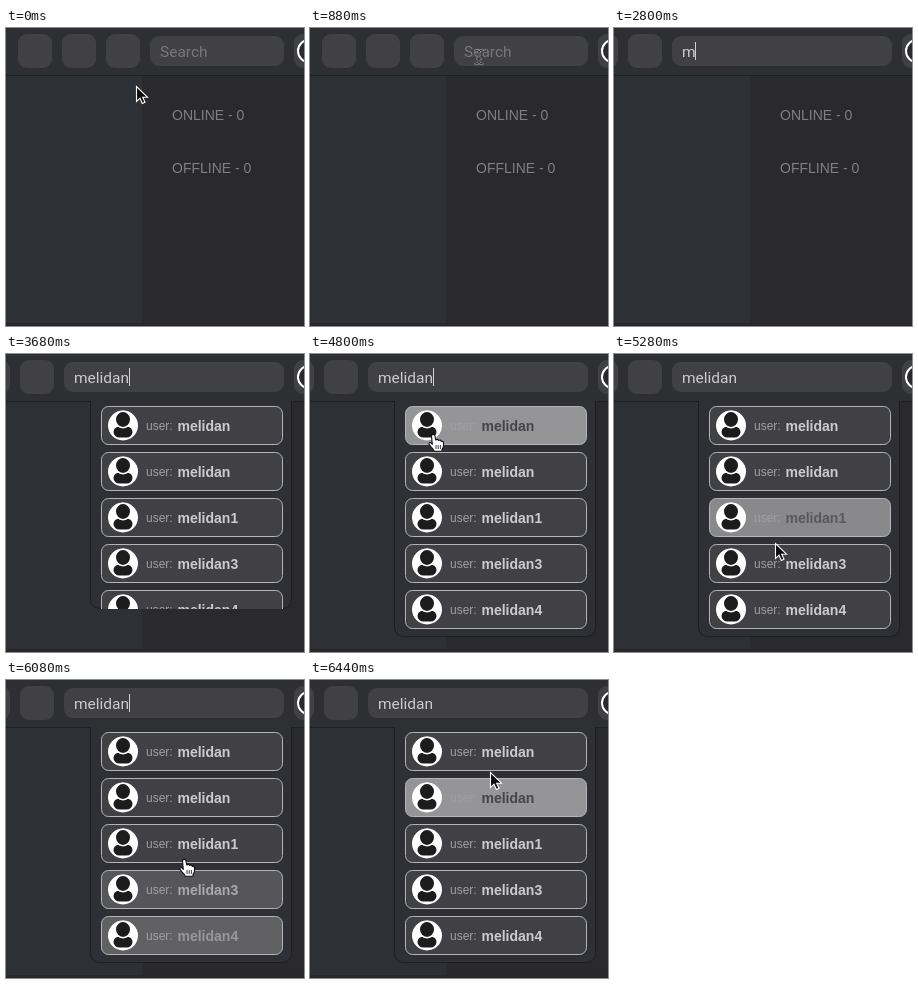
Write an HTML page that moves like this. It is 298 px wide and 298 px high and loops after 6480 ms.

```html
<!DOCTYPE html>
<html lang="en">
<head>
<meta charset="utf-8">
<title>User search</title>
<style>
  html, body { margin: 0; width: 100%; height: 100%; overflow: hidden; background: #2d3035; }
  svg { display: block; width: 100%; height: 100%; }
  text { font-family: "Liberation Sans", Arial, sans-serif; white-space: pre; }
  .input { font: 400 15.5px Roboto, Inter, sans-serif; }
  .status { font-size: 14px; fill: #7f7f83; }
  .label { font-size: 12px; fill: #a0a0a2; }
  .name { font-size: 14px; font-weight: 700; }
</style>
</head>
<body>
<svg viewBox="0 0 298 298">
  <defs>
    <clipPath id="panelClip"><rect id="clipBox" x="85" y="47" width="201" height="0"/></clipPath>
    <g id="avatar">
      <circle r="15" fill="#fff"/>
      <rect x="-9.5" y="1" width="19" height="11" rx="6" fill="#1c1c1c"/>
      <ellipse cy="-6" rx="7.8" ry="8.2" fill="#1c1c1c" stroke="#fff" stroke-width="1.6"/>
    </g>
    <path id="stem" d="M-3.5-7Q-.5-7 0-5Q.5-7 3.5-7M0-5V5M-3.5 7Q-.5 7 0 5Q.5 7 3.5 7M-2 2H2"/>
  </defs>

  <rect width="298" height="298" fill="#2d3035"/>
  <rect x="136" y="47" width="162" height="251" fill="#2a2a2e"/>
  <rect y="295" width="298" height="3" fill="#2b252c"/>
  <rect width="298" height="47" fill="#2d2f33"/>
  <rect y="47" width="298" height="1" fill="#1f2023"/>
  <text class="status" x="166" y="92">ONLINE - 0</text>
  <text class="status" x="166" y="145">OFFLINE - 0</text>

  <g id="buttons" fill="#414145"></g>
  <rect id="field" y="8" height="30" rx="9" fill="#414145"/>
  <text id="hint" class="input" y="29" fill="#78787c">Search</text>
  <text id="typed" class="input" x="68" y="29" fill="#cbcbcf"></text>
  <rect id="caret" y="14" width="1" height="18" fill="#d0d0d2"/>
  <rect x="288" y="6" width="34" height="34" rx="9" fill="#414145"/>
  <circle cx="303" cy="23" r="11" fill="#2a2a2e" stroke="#fff" stroke-width="2"/>

  <g id="panel">
    <path id="panelBox" fill="#2e3035" stroke="#1d1e21"/>
    <g id="items" clip-path="url(#panelClip)"></g>
  </g>

  <path id="arrow" d="M.5.5V15.5L4 12.200L6.300 17.5L9 16.300L6.700 11.200H11.5Z" fill="#0c0c0c" stroke="#fff" stroke-width="1.1"/>
  <g id="beam" fill="none" stroke-linecap="round">
    <use href="#stem" stroke="#c8c8c8" stroke-opacity=".55" stroke-width="2.4"/>
    <use href="#stem" stroke="#222"/>
  </g>
  <g id="hand" stroke="#111">
    <path d="M-1.7 9.5L-2.5 1Q-2.3-.6-.8-.6T1 1L1.7 5Q4 3.500 4.600 5.5Q6.800 4.300 7.200 6.400Q9.5 5.800 9.5 8.200V11.5Q9 13 8 14.5V16.200H.3Q-.5 14.5-2.800 12.200L-5 9.300Q-5.300 7.500-3.700 7.500Q-2.600 7.800-1.700 9.5Z" fill="#fff" stroke-width="1.1" stroke-linejoin="round"/>
    <path d="M2 10V14M4.200 10V14M6.400 10V14" stroke-width=".8"/>
  </g>
</svg>

<script>
const LOOP = 6480, STEP = 40;
const NAME = "melidan";
// Steady typing with one short pause after the third letter
const KEYS = [...NAME].map((_, i) => 2800 + 120 * i + (i > 2 ? 80 : 0));
const FOCUS = 1340, OPEN = 3224, RETURN = 4560, FADE = 220;
const TOP = 52, PITCH = 46, ITEM_H = 39;

// time, x, y of the pointer's hot spot
const TO_FIELD = [[0, 130, 58], [640, 170, 32], [720, 169, 33], [1080, 170, 25]];
const OVER_LIST = [
  [4520, 164, 40], [4800, 124, 81], [5460, 175, 230], [5680, 178, 241],
  [5920, 178, 246], [6200, 180, 130], [6440, 180, 92]
];

const $ = id => document.getElementById(id);
const clamp = v => Math.min(1, Math.max(0, v));
const smooth = p => p * p * (3 - 2 * p);
const set = (el, attrs) => { for (const k in attrs) el.setAttribute(k, attrs[k]); };
const show = (el, on) => { el.style.display = on ? "" : "none"; };
const mix = (a, b, p) => "rgb(" + a.map((v, i) => Math.round(v + (b[i] - v) * p)) + ")";

for (let i = 0; i < 3; i++) {
  $("buttons").insertAdjacentHTML("beforeend",
    `<rect x="${12 + 44 * i}" y="6" width="34" height="34" rx="9"/>`);
}

const rows = ["", "", "1", "3", "4"].map((suffix, i) => {
  const y = TOP + i * PITCH;
  $("items").insertAdjacentHTML("beforeend", `<g>
    <rect x="95.5" y="${y + .5}" width="181" height="${ITEM_H - 1}" rx="7" stroke="#b4b4b9"/>
    <use href="#avatar" x="117" y="${y + 19.5}"/>
    <text class="label" x="140" y="${y + 24}">user:</text>
    <text class="name" x="171.5" y="${y + 25}">${NAME + suffix}</text></g>`);
  const g = $("items").lastElementChild;
  return { y, box: g.querySelector("rect"), name: g.querySelector(".name") };
});

function along(path, t) {
  let i = 1;
  while (i < path.length - 1 && path[i][0] < t) i++;
  const a = path[i - 1], b = path[i], p = clamp((t - a[0]) / (b[0] - a[0]));
  return [a[1] + (b[1] - a[1]) * p, a[2] + (b[2] - a[2]) * p];
}

const inside = (y, row) => y >= row.y && y < row.y + ITEM_H;

// Fade level built up from the time spent over and off the row
function hover(row, t) {
  const dt = 10;
  let level = 0;
  for (let s = OVER_LIST[0][0]; s < t; s += dt) {
    level = clamp(level + (inside(along(OVER_LIST, s)[1], row) ? dt : -dt) / FADE);
  }
  return smooth(level);
}

function drawPointer(t) {
  const early = t < KEYS[0];
  const [x, y] = along(early ? TO_FIELD : OVER_LIST, t);
  const kind = y < 38 ? "beam" : !early && rows.some(r => inside(y, r)) ? "hand" : "arrow";
  for (const id of ["arrow", "beam", "hand"]) show($(id), (early || t >= RETURN) && id === kind);
  set($(kind), { transform: `translate(${Math.round(x)} ${Math.round(y)})` });
}

function drawField(t) {
  const shift = 86 * smooth(clamp((t - 1320) / 200));
  set($("buttons"), { transform: `translate(${-shift} 0)` });
  set($("field"), { x: 144 - shift, width: 134 + shift });
  set($("hint"), { x: 154 - shift });
  const count = KEYS.filter(k => k <= t).length;
  $("typed").textContent = NAME.slice(0, count);
  show($("hint"), !count);
  const last = count ? KEYS[count - 1] : FOCUS;
  const width = count ? $("typed").getComputedTextLength() : 0;
  set($("caret"), { x: Math.floor(154 - shift + width) });
  show($("caret"), t >= FOCUS && Math.floor((t - last) / 500) % 2 === 0);
}

function drawPanel(t) {
  show($("panel"), t >= OPEN);
  if (t < OPEN) return;
  const h = Math.round(236 * (1 - Math.exp((OPEN - t) / 214)));
  const b = 47 + h - .5, r = Math.min(10, h);
  set($("clipBox"), { height: h });
  set($("panelBox"), { d: `M84.5 47V${b - r}Q84.5 ${b} ${84.5 + r} ${b}H${285.5 - r}Q285.5 ${b} 285.5 ${b - r}V47` });
  for (const row of rows) {
    const p = hover(row, t);
    set(row.box, { fill: mix([65, 65, 69], [153, 153, 155], p) });
    set(row.name, { fill: mix([204, 204, 208], [62, 62, 66], p) });
  }
}

function draw(t) {
  drawField(t);
  drawPanel(t);
  drawPointer(t);
}

const start = performance.now();
function tick() {
  const t = (performance.now() - start) % LOOP;
  draw(Math.floor(t / STEP) * STEP);
  requestAnimationFrame(tick);
}
tick();
</script>
</body>
</html>
```
